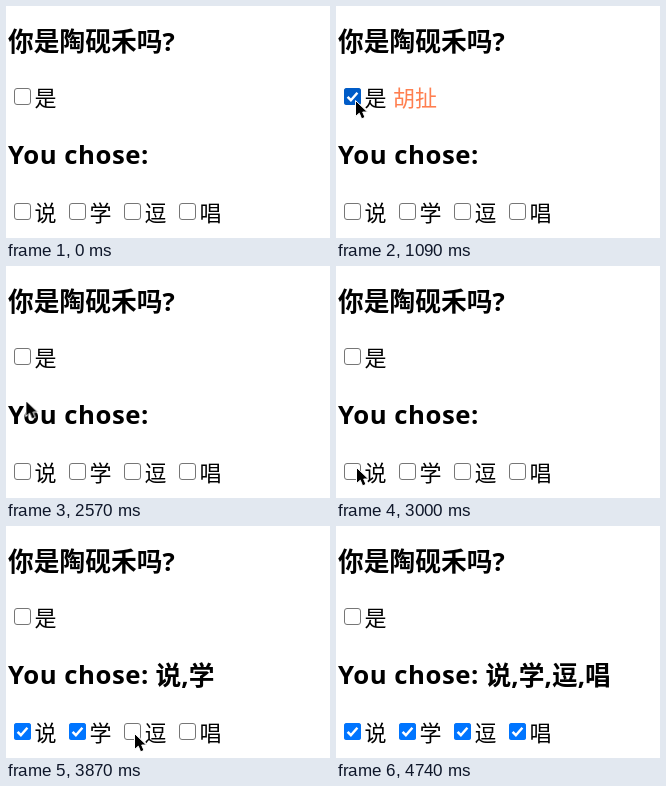
Animation, 324 px wide and 232 px high, one loop 5240 ms. Source, as an HTML page:

```html
<!DOCTYPE html>
<html lang="zh-CN">
<head>
<meta charset="utf-8">
<title>Checkboxes</title>
<style>
  html, body { margin: 0; width: 100%; height: 100%; overflow: hidden; background: #fff; }
  svg { display: block; width: 324px; height: 232px; }
  text { font: 22px "Open Sans", "Noto Sans CJK SC", "Noto Sans CJK", sans-serif; fill: #000; }
  .head { font-size: 25.74px; font-weight: 700; }
  .latin { letter-spacing: .5px; }
  .note { fill: #ff7f50; }

  .yes, .pick, .cursor, .halo { animation: 5240ms step-end infinite; }
  .yes { color: #005cc8; animation-name: yes; }
  .p1 { animation-name: p1; }
  .p2 { animation-name: p2; }
  .p3 { animation-name: p3; }
  .p4 { animation-name: p4; }
  .cursor { animation-name: move; }
  .halo { animation-name: press; }

  @keyframes yes {
    0%, 41.6%, 100% { visibility: hidden; }
    18.12% { visibility: visible; }
  }

  /* Checked while hovered (dark), then left (bright) */
  @keyframes p1 {
    0% { visibility: hidden; color: #005cc8; }
    57.82% { visibility: visible; color: #005cc8; }
    60.68%, 100% { visibility: visible; color: #0075ff; }
  }
  @keyframes p2 {
    0% { visibility: hidden; color: #005cc8; }
    66.6% { visibility: visible; color: #005cc8; }
    69.84%, 100% { visibility: visible; color: #0075ff; }
  }
  @keyframes p3 {
    0% { visibility: hidden; color: #005cc8; }
    77.29% { visibility: visible; color: #005cc8; }
    78.24%, 100% { visibility: visible; color: #0075ff; }
  }
  @keyframes p4 {
    0% { visibility: hidden; color: #005cc8; }
    84.54% { visibility: visible; color: #005cc8; }
    86.45%, 100% { visibility: visible; color: #0075ff; }
  }

  @keyframes move {
    0% { transform: translate(268px, 260px); }
    5.91% { transform: translate(268px, 215px); animation-timing-function: steps(5, end); }
    10.3% { transform: translate(100px, 128px); animation-timing-function: steps(5, end); }
    14.69% { transform: translate(19px, 94px); }
    46.56% { transform: translate(19px, 94px); animation-timing-function: steps(8, start); }
    54.38% { transform: translate(20px, 201px); }
    58.77% { transform: translate(20px, 201px); animation-timing-function: steps(5, start); }
    63.74% { transform: translate(71px, 205px); }
    67.93% { transform: translate(71px, 205px); animation-timing-function: steps(7, start); }
    74.42% { transform: translate(128px, 207px); }
    78.24% { transform: translate(163px, 208px); }
    79.19% { transform: translate(190px, 209px); }
    85.49% { transform: translate(190px, 209px); animation-timing-function: steps(5, start); }
    90.45%, 100% { transform: translate(208px, 260px); }
  }

  @keyframes press {
    0%, 18.12%, 41.6%, 57.25%, 66.6%, 77.29%, 84.54%, 100% { visibility: hidden; }
    16.22%, 39.69%, 55.34%, 64.69%, 75.38%, 82.63% { visibility: visible; }
  }
</style>
</head>
<body>
<svg viewBox="0 0 324 232">
  <defs>
    <rect id="box" x=".5" y=".5" width="16" height="16" rx="2.5" fill="#fff" stroke="#767676"/>
    <g id="tick">
      <rect width="17" height="17" rx="2.5" fill="currentColor"/>
      <path d="M3.6 8.8l3.3 3.4L13.4 4.8" fill="none" stroke="#fff" stroke-width="2.5"/>
    </g>
  </defs>

  <text class="head" x="2" y="44.5">你是陶砚禾吗?</text>
  <use href="#box" x="8" y="82"/>
  <text x="28.5" y="100">是</text>
  <g class="yes">
    <use href="#tick" x="8" y="82"/>
    <text class="note" x="57" y="100">胡扯</text>
  </g>

  <text class="head latin" x="2" y="158">You chose:</text>
  <text class="head" x="149.5" y="158.5"><tspan class="pick p1">说</tspan><tspan class="pick p2">,学</tspan><tspan class="pick p3">,逗</tspan><tspan class="pick p4">,唱</tspan></text>

  <use href="#box" x="8" y="197"/>
  <use href="#box" x="63" y="197"/>
  <use href="#box" x="118" y="197"/>
  <use href="#box" x="173" y="197"/>
  <use class="pick p1" href="#tick" x="8" y="197"/>
  <use class="pick p2" href="#tick" x="63" y="197"/>
  <use class="pick p3" href="#tick" x="118" y="197"/>
  <use class="pick p4" href="#tick" x="173" y="197"/>
  <text x="28.5" y="215">说</text>
  <text x="83.5" y="215">学</text>
  <text x="138.5" y="215">逗</text>
  <text x="193.5" y="215">唱</text>

  <g class="cursor">
    <circle class="halo" r="15" fill="#ffeb00" fill-opacity=".6"/>
    <path d="M.5 .5V16.5L4.3 13.2 6.6 18.8 10 17.4 7.7 12H12.5Z" stroke="#fff" stroke-width="1"/>
  </g>
</svg>
</body>
</html>
```
